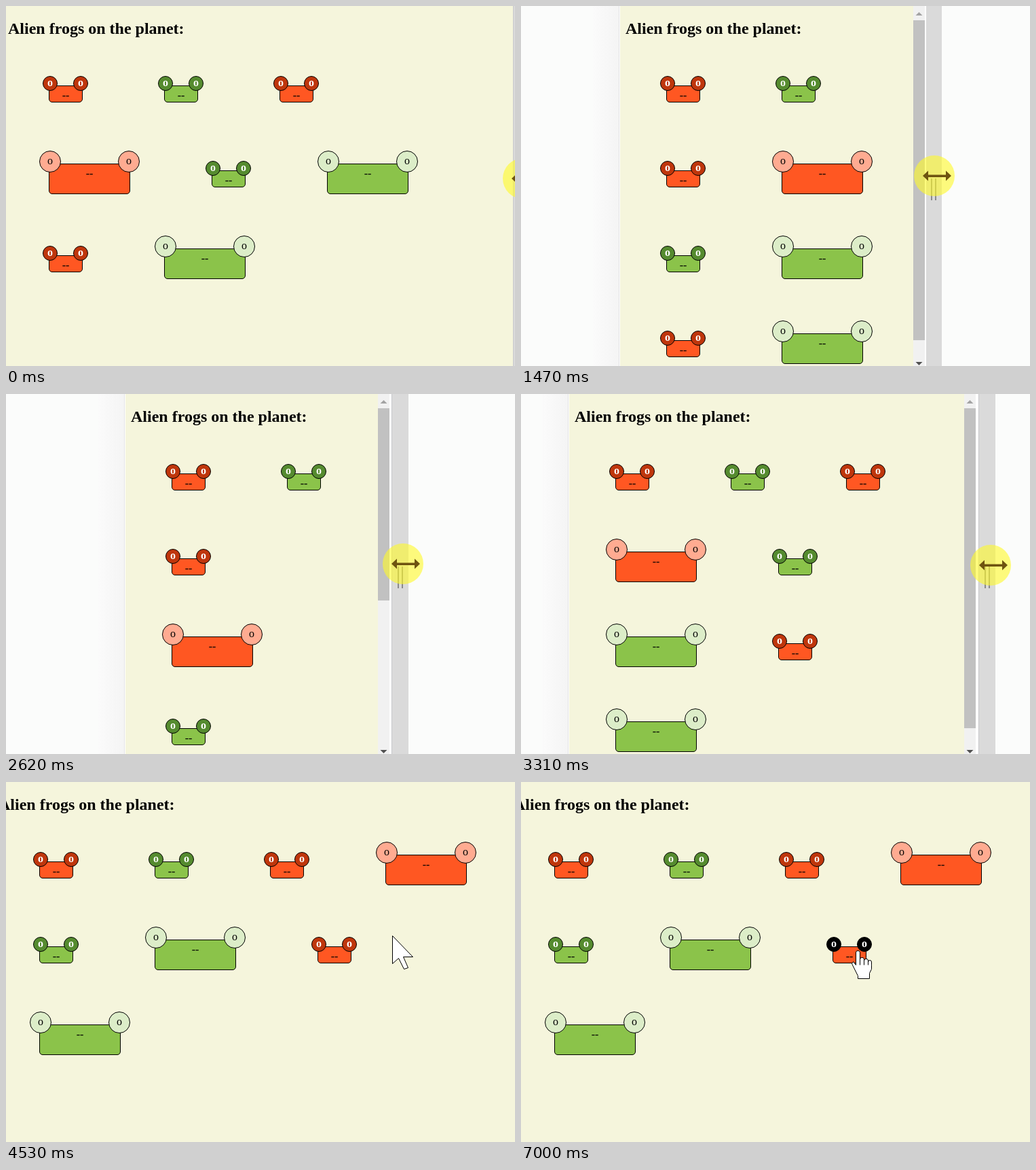
An HTML page with a canvas that plays this animation: 750x530 px, repeating every 7460 ms.

```html
<!DOCTYPE html>
<html lang="en">
<head>
<meta charset="utf-8">
<title>Alien frogs</title>
<style>
html, body { margin: 0; width: 100%; height: 100%; overflow: hidden; background: #f5f5dc; }
canvas { display: block; width: 750px; height: 530px; }
</style>
</head>
<body>
<canvas id="stage" width="750" height="530"></canvas>
<script>
const ctx = document.getElementById('stage').getContext('2d');
const W = 750, H = 530, LOOP = 7460, STEP = 76.9;
const BEIGE = '#f5f5dc', BROWN = '#6e5410';
const SERIF = '"Liberation Serif", "Times New Roman", serif';

const RED = { body: '#ff5722', dark: '#bf360c', light: '#ffab91' };
const GREEN = { body: '#8bc34a', dark: '#558b2f', light: '#dcedc8' };
// Capitals are big frogs.
const frogs = [...'rgrRgGrG'].map(c => ({
  color: c.toLowerCase() === 'r' ? RED : GREEN,
  big: c < 'a'
}));

// Left edge of the resized panel: [step, x].
const dragKeys = [[-1, -5], [10, 80], [17, 146], [19, 154], [27, 206], [32, 176], [41, 71], [50, -19]];

// Free pointer after the drag; each move bends down by its dip.
const RELEASE = 53;
const moves = [
  { begin: RELEASE, end: 57, x: 569, y: 226, dip: 0 },
  { begin: 57, end: 61, x: 614, y: 128, dip: 0 },
  { begin: 65, end: 76, x: 296, y: 266, dip: 78 },
  { begin: 83, end: 89, x: 496, y: 248, dip: 34 }
];

// Monotone cubic through the drag keys.
function panelLeft(k) {
  const keys = dragKeys, n = keys.length - 1;
  if (k <= keys[0][0]) return keys[0][1];
  if (k >= keys[n][0]) return keys[n][1];
  let i = 0;
  while (k >= keys[i + 1][0]) i++;
  const rate = j => (keys[j + 1][1] - keys[j][1]) / (keys[j + 1][0] - keys[j][0]);
  const slope = j => {
    if (j === 0 || j === n) return 0;
    const a = rate(j - 1), b = rate(j);
    return a * b > 0 ? 2 * a * b / (a + b) : 0;
  };
  const [k0, v0] = keys[i], [k1, v1] = keys[i + 1];
  const d = k1 - k0, u = (k - k0) / d, w = 1 - u;
  return v0 * (1 + 2 * u) * w * w + slope(i) * d * u * w * w
    + v1 * u * u * (3 - 2 * u) - slope(i + 1) * d * u * u * w;
}

function pointer(k) {
  let x = 800, y = 254;
  for (const m of moves) {
    if (k < m.begin) break;
    const u = Math.min(1, (k - m.begin) / (m.end - m.begin));
    const e = 1 - (1 - u) ** 2;
    x += (m.x - x) * e;
    y += (m.y - y) * e + 4 * m.dip * e * (1 - e);
  }
  return { x: Math.round(x), y: Math.round(y) };
}

// Wraps the frogs like inline blocks.
function wrap(width) {
  let x = 0, row = 0;
  const spots = frogs.map(frog => {
    const w = frog.big ? 240 : 170;
    if (x > 0 && x + w > width) { x = 0; row++; }
    const spot = { ...frog, x, row };
    x += w;
    return spot;
  });
  return { spots, rows: row + 1 };
}

function rect(x, y, w, h, color) {
  ctx.fillStyle = color;
  ctx.fillRect(x, y, w, h);
}

function paint(fill, outlined) {
  ctx.fillStyle = fill;
  ctx.fill();
  if (!outlined) return;
  ctx.strokeStyle = '#000';
  ctx.lineWidth = 1;
  ctx.stroke();
}

function poly(points, x, y) {
  ctx.beginPath();
  for (let i = 0; i < points.length; i += 2) ctx.lineTo(x + points[i], y + points[i + 1]);
}

function circle(x, y, r, fill, outlined) {
  ctx.beginPath();
  ctx.arc(x, y, r, 0, 7);
  paint(fill, outlined);
}

function box(x, y, w, h, r, fill) {
  ctx.beginPath();
  ctx.roundRect(x, y, w, h, r);
  paint(fill, true);
}

function text(str, x, y, color, font, align) {
  ctx.font = font + ' ' + SERIF;
  ctx.textAlign = align;
  ctx.fillStyle = color;
  ctx.fillText(str, x, y);
}

function measure(frog, left) {
  const x = left + 68 + frog.x, base = 142 + 125 * frog.row + (frog.big ? 10 : 0);
  return frog.big
    ? { x, base, w: 120, h: 45, r: 16, eyeY: base - 48, eyes: [x + 2, x + 118] }
    : { x, base, w: 50, h: 25, r: 11, eyeY: base - 28, eyes: [x + 2, x + 47] };
}

function hit(b, p) {
  return p.x >= b.x && p.x < b.x + b.w && p.y >= b.base - b.h && p.y < b.base
    || b.eyes.some(x => Math.hypot(p.x - x, p.y - b.eyeY) < b.r);
}

function drawFrog({ color, big }, b, hover) {
  box(b.x + .5, b.base - b.h + .5, b.w - 1, b.h - 1, 4.5, color.body);
  text('--', b.x + b.w / 2, b.base - (big ? 25 : 5), '#000', '16px', 'center');
  for (const x of b.eyes) {
    circle(x, b.eyeY, b.r - .5, hover ? '#000' : big ? color.light : color.dark, true);
    text('o', x, b.eyeY + 4, big && !hover ? '#000' : '#fff', big ? '16px' : 'bold 16px', 'center');
  }
}

function drawScrollbar(x, rows) {
  rect(x, 0, 17, H, '#f1f1f1');
  rect(x, 21, 17, Math.round(265900 / (64.5 + 125 * rows)), '#c1c1c1');
  poly([0, 0, 5, 5, -5, 5], x + 8.5, 9);
  paint('#a3a3a3');
  poly([0, 0, 5, -5, -5, -5], x + 8.5, 529);
  paint('#505050');
}

function drawSurround(left, grip) {
  rect(0, 0, W, H, '#fbfcfb');
  if (left > 0) {
    const shade = ctx.createLinearGradient(left - 40, 0, left, 0);
    shade.addColorStop(0, '#fbfbfb');
    shade.addColorStop(1, '#f4f4f4');
    rect(left - 40, 0, 40, H, shade);
    rect(left - 2, 0, 1, H, '#e4e4e6');
    rect(left - 1, 0, 1, H, '#fff');
  }
  rect(grip, 0, 25, H, '#dadada');
  rect(grip, 0, 1, H, '#c8c8cc');
  for (const dx of [9, 15]) rect(grip + dx, 254, 2, 32, '#8a8a8a');
}

function drawDrag(x, y) {
  circle(x, y, 30, 'rgba(255,250,40,.6)');
  const c = x + 4;
  rect(c - 15, y - 1.5, 30, 3.5, BROWN);
  for (const s of [-1, 1]) {
    poly([21 * s, 0, 13 * s, -7.5, 13 * s, 7.5], c, y);
    paint(BROWN);
  }
}

function drawArrow(x, y) {
  poly([0, 0, 0, 41, 9, 33, 17, 49, 23, 47, 16, 31, 30, 31], x, y);
  ctx.closePath();
  paint('#fff', true);
}

function drawHand(x, y) {
  for (let i = 3; i >= 0; i--) {
    const top = i ? 8 + 2 * i : 0;
    box(x - 3 + 6 * i, y + top, i < 3 ? 6 : 5, 26 - top, 2.5, '#fff');
  }
  poly([-3, 21, -7, 16, -9, 19, 0, 37, 0, 41, 17, 41, 17, 33, 20, 27, 20, 21], x, y);
  paint('#fff', true);
}

function draw(ms) {
  // The picture advances at thirteen steps a second.
  const k = Math.floor((ms - 150) / STEP + .1);
  const left = Math.round(panelLeft(k)), right = 741 - left;
  // The grip and the cursor run slightly ahead of the panel.
  const grip = Math.round(742 - panelLeft(k + .25));
  let flow = wrap(right - left - 16);
  const scroll = flow.rows > 3;
  if (scroll) flow = wrap(right - left - 33);

  drawSurround(left, grip);
  if (scroll) rect(right, 0, 2, H, '#fff');
  rect(left, 0, (scroll ? right : grip) - left, H, BEIGE);
  text('Alien frogs on the planet:', left + 8, 41, '#000', 'bold 24px', 'left');

  const free = k >= RELEASE, mouse = pointer(k);
  let over = false;
  for (const frog of flow.spots) {
    const b = measure(frog, left);
    const hover = free && hit(b, mouse);
    over = over || hover;
    drawFrog(frog, b, hover);
  }
  if (scroll) drawScrollbar(right - 17, flow.rows);
  if (free) (over ? drawHand : drawArrow)(mouse.x + .5, mouse.y + .5);
  else drawDrag(Math.round(757 - panelLeft(k + .5)), Math.round(254 - left / 40));
}

const start = performance.now();
function tick() {
  draw((performance.now() - start) % LOOP);
  requestAnimationFrame(tick);
}
tick();
</script>
</body>
</html>
```
